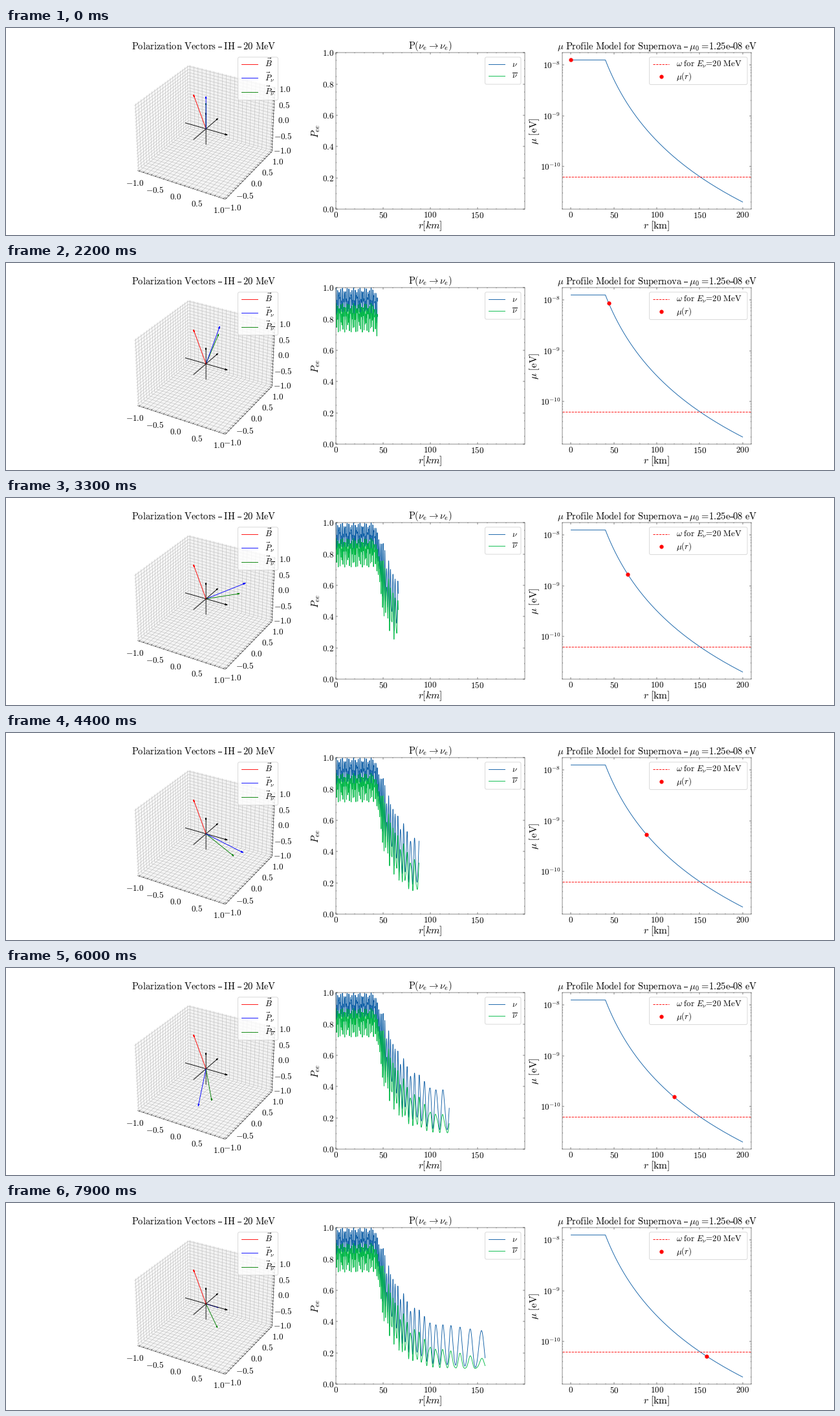
A matplotlib script for the animation above (8000 ms loop, 1280x320 px).

```python
import numpy as np
import matplotlib.pyplot as plt
from matplotlib.animation import FuncAnimation
from matplotlib.collections import LineCollection
from matplotlib.patches import FancyBboxPatch, Polygon
from matplotlib.ticker import (AutoMinorLocator, FuncFormatter, MultipleLocator,
                               NullFormatter)

W, H, DPI = 1280, 320, 80
PX = 72 / DPI                      # points per pixel
FRAMES, STEP_KM, SUB = 80, 2.0, 250
BLUE, GREEN = '#0C5DA5', '#00B945'
LINE, THIN = 0.89 * PX, 0.45 * PX
SMALL, LARGE = 13.1, 15.5          # text sizes in pixels

plt.rcParams.update({
    'mathtext.fontset': 'cm',
    'axes.linewidth': THIN,
    'lines.linewidth': LINE,
    'patch.linewidth': LINE,
    'axes.titlesize': 14.6 * PX,
    'axes.titlepad': 5.6 * PX,
    'xtick.top': True,
    'ytick.right': True,
})
for axis in ('xtick', 'ytick'):
    plt.rcParams.update({
        axis + '.direction': 'in',
        axis + '.labelsize': SMALL * PX,
        axis + '.major.size': 2.67 * PX,
        axis + '.minor.size': 1.33 * PX,
        axis + '.major.width': THIN,
        axis + '.minor.width': THIN,
        axis + '.major.pad': 3.1 * PX,
    })

# ---- physics: two coupled polarization vectors ----
ENERGY = 20e6                      # eV
OMEGA = 2.5e-3 / (2 * ENERGY)      # eV
MU0, R0 = 1.25e-8, 40.0            # eV, km
PER_KM = 5.068e9                   # eV to 1/km
THETA = np.arcsin(np.sqrt(2.18e-2))
B = (-float(np.sin(2 * THETA)), 0.0, float(np.cos(2 * THETA)))
RATIO = 0.8                        # antineutrino to neutrino flux


def mu(r):
    return MU0 * (R0 / np.maximum(r, R0)) ** 4


def slope(r, s):
    px, py, pz, qx, qy, qz = s
    m = MU0 * PER_KM * (R0 / max(r, R0)) ** 4
    w = OMEGA * PER_KM
    dx, dy, dz = m * (px - qx), m * (py - qy), m * (pz - qz)
    bx, by, bz = w * B[0], w * B[1], w * B[2]
    ax, ay, az = dx + bx, dy + by, dz + bz
    cx, cy, cz = dx - bx, dy - by, dz - bz
    return (ay * pz - az * py, az * px - ax * pz, ax * py - ay * px,
            cy * qz - cz * qy, cz * qx - cx * qz, cx * qy - cy * qx)


def advance(s, k, h):
    return [a + h * b for a, b in zip(s, k)]


def evolve():
    h = STEP_KM / SUB
    s = [0.0, 0.0, 1.0, 0.0, 0.0, RATIO]
    out = [s]
    for i in range((FRAMES - 1) * SUB):
        r = i * h
        k1 = slope(r, s)
        k2 = slope(r + h / 2, advance(s, k1, h / 2))
        k3 = slope(r + h / 2, advance(s, k2, h / 2))
        k4 = slope(r + h, advance(s, k3, h))
        s = [v + h / 6 * (a + 2 * b + 2 * c + d)
             for v, a, b, c, d in zip(s, k1, k2, k3, k4)]
        out.append(s)
    return np.array(out)


path = evolve()
radius = np.arange(len(path)) * STEP_KM / SUB
prob_nu = (1 + path[:, 2]) / 2
prob_anti = (1 + path[:, 5]) / 2

# ---- text and key helpers ----
HYPHEN = r'\frac{\;\,}{\;\,}\hspace{-0.09}'


def rm(s):
    """Upright text in math mode, with short hyphens."""
    words = (r'\text{%s}' % w.replace('-', '}' + HYPHEN + r'\text{')
             for w in s.split(' '))
    return r'\ '.join(words).replace(r'\text{}', '')


fig = plt.figure(figsize=(W / DPI, H / DPI), dpi=DPI, facecolor='white')
over = fig.add_axes([0, 0, 1, 1], zorder=5)
over.set_xlim(0, W)
over.set_ylim(H, 0)
over.axis('off')


def put(x, y, s, size=LARGE, rot=0):
    over.text(x, y, s, fontsize=size * PX, rotation=rot,
              ha='center', va='center')


def key(x, y, w, h, rows):
    """Framed key; each row is (height, label, line style)."""
    over.add_patch(FancyBboxPatch((x, y), w, h, facecolor='white',
                                  edgecolor='0.8', alpha=0.8,
                                  boxstyle='round,pad=0,rounding_size=2.5'))
    for cy, label, style in rows:
        xs = [x + 18] if 'marker' in style else [x + 5.5, x + 30.5]
        over.plot(xs, [cy] * len(xs), **style)
        over.text(x + 41.5, cy + 4.4, label, fontsize=12.9 * PX, va='baseline')


# ---- panel positions ----
BOTTOM, TOP = 0.125, 0.88
SIDE = (TOP - BOTTOM) * H
WIDE = 0.775 * W / 3.4
LEFT = [0.125 * W + i * 1.2 * WIDE for i in range(3)]


def panel(x, w):
    return fig.add_axes([x / W, BOTTOM, w / W, TOP - BOTTOM])


# ---- left: 3D view ----
x0, y0 = LEFT[0] + (WIDE - SIDE) / 2, (1 - TOP) * H
view = panel(x0, SIDE)
view.set_xlim(x0, x0 + SIDE)
view.set_ylim(y0 + SIDE, y0)
view.axis('off')
view.set_title('$' + rm('Polarization Vectors - IH - 20 MeV') + '$')

SCALE = SIDE / 0.185
CX = x0 + SIDE / 2 + 0.0025 * SCALE
CY = y0 + SIDE / 2 - 0.0025 * SCALE
BOX = 1.8294640721620434 * np.array([4, 4, 3]) / np.sqrt(41) / 2
el, az = np.radians(30), np.radians(-60)
RIGHT = np.array([-np.sin(az), np.cos(az), 0])
UP = np.array([-np.sin(el) * np.cos(az), -np.sin(el) * np.sin(az), np.cos(el)])
EYE = np.array([np.cos(el) * np.cos(az), np.cos(el) * np.sin(az), np.sin(el)])


def project(points):
    p = np.asarray(points, float) * BOX
    f = SCALE / (10 - p @ EYE)
    return np.column_stack([CX + f * (p @ RIGHT), CY - f * (p @ UP)])


M = 25 / 24
panes = [
    ([(-M, -M, -M), (-M, M, -M), (-M, M, M), (-M, -M, M)], 0.975),
    ([(-M, M, -M), (M, M, -M), (M, M, M), (-M, M, M)], 0.95),
    ([(-M, -M, -M), (M, -M, -M), (M, M, -M), (-M, M, -M)], 0.9625),
]
for corners, shade in panes:
    view.add_patch(Polygon(project(corners), facecolor=str(shade),
                           edgecolor='none', clip_on=False, zorder=1))

grid, ticks = [], []
IN, OUT = M - 0.033, M + 0.017
for t in np.linspace(-1, 1, 21):
    grid += [project([(t, -M, -M), (t, M, -M), (t, M, M)]),
             project([(M, t, -M), (-M, t, -M), (-M, t, M)]),
             project([(M, M, t), (-M, M, t), (-M, -M, t)])]
    ticks += [project([(t, -OUT, -M), (t, -IN, -M)]),
              project([(OUT, t, -M), (IN, t, -M)]),
              project([(OUT, M, t), (IN, M, t)])]
edges = [project(e) for e in ([(-M, -M, -M), (M, -M, -M)],
                              [(M, -M, -M), (M, M, -M)],
                              [(M, M, -M), (M, M, M)])]
for segs, color, z in ((grid, '#b0b0b0', 1.5), (ticks + edges, 'black', 2)):
    view.add_collection(LineCollection(segs, colors=color, zorder=z,
                                       linewidths=THIN, clip_on=False),
                        autolim=False)

for t in (-1, -0.5, 0, 0.5, 1):
    spots = project([(t, -M, -M), (M, t, -M), (M, M, t)])
    for (x, y), (dx, dy) in zip(spots, ((-7, 19), (10, 15.5), (15.5, 2))):
        put(x + dx, y + dy, f'${t:.1f}$', SMALL)


def arrow_path(base, tip, ratio=0.05):
    a, b = project([base, tip])
    d = (a - b) * ratio
    c, s = np.cos(np.radians(15)), np.sin(np.radians(15))
    barbs = [b + (c * d[0] - k * d[1], k * d[0] + c * d[1]) for k in (s, -s)]
    return np.array([a, b, barbs[0], b, barbs[1]]).T


def arrow(base, tip, color, z=3.0):
    return view.plot(*arrow_path(base, tip), color=color, zorder=z,
                     clip_on=False)[0]


for unit in np.eye(3):
    arrow(-unit / 2, unit / 2, 'black')
ORIGIN = (0, 0, 0)
arrow(ORIGIN, B, 'red', 3.1)
arrow_nu = arrow(ORIGIN, (0, 0, 1), 'blue')
arrow_anti = arrow(ORIGIN, (0, 0, RATIO), 'green')
key(358.5, 45, 62, 66.5, [
    (56, r'$\vec{B}$', {'color': 'red'}),
    (77.3, r'$\vec{P}_\nu$', {'color': 'blue'}),
    (99, r'$\vec{P}_{\overline{\nu}}$', {'color': 'green'})])

# ---- middle: survival probability ----
prob = panel(LEFT[1], WIDE)
line_nu, = prob.plot([], [], color=BLUE)
line_anti, = prob.plot([], [], color=GREEN)
prob.set_xlim(0, 199.99)
prob.set_ylim(0, 1)
prob.yaxis.set_major_locator(MultipleLocator(0.2))
prob.yaxis.set_minor_locator(AutoMinorLocator(4))
prob.yaxis.set_major_formatter(FuncFormatter(lambda v, _: f'${v:.1f}$'))
prob.set_title(r'$\text{P}(\nu_e\rightarrow\nu_e)$')
key(740.5, 45, 55.5, 42, [
    (56, r'$\nu$', {'color': BLUE}),
    (74, r'$\overline{\nu}$', {'color': GREEN})])
put(655.5, 306, '$r[km]$')
put(479.5, 159, '$P_{ee}$', rot=90)

# ---- right: potential profile ----
prof = panel(LEFT[2], WIDE)
r_all = np.linspace(0, 200, 1001)
prof.plot(r_all, mu(r_all), color=BLUE)
prof.set_yscale('log')
prof.set_xlim(-10, 210)
span = (mu(0) / mu(200)) ** 0.05
prof.set_ylim(mu(200) / span, mu(0) * span)
DASH = {'color': 'red', 'ls': '--'}
SPOT = {'color': 'red', 'marker': 'o', 'ms': 5.33 * PX, 'mew': LINE, 'ls': ''}
prof.axhline(OMEGA, **DASH)
dot, = prof.plot([0], [MU0], **SPOT)
prof.yaxis.set_major_formatter(
    FuncFormatter(lambda v, _: '$10^{%d}$' % round(np.log10(v))))
prof.yaxis.set_minor_formatter(NullFormatter())
prof.set_title(r'$\mu\ ' + rm('Profile Model for Supernova -') + r'\ \mu_0\;'
               + rm(f'={MU0:.2e} eV') + '$')
key(994.5, 45, 151.5, 42.5, [
    (55.5, r'$\omega\ ' + rm('for') + r'\ E_\nu' + rm('=20 MeV') + '$', DASH),
    (74.7, r'$\mu(r)$', SPOT)])
put(1006, 306, r'$r\ \text{[km]}$')
put(817, 159, r'$\mu\ \text{[eV]}$', rot=90)

for ax in (prob, prof):
    ax.xaxis.set_major_locator(MultipleLocator(50))
    ax.xaxis.set_minor_locator(AutoMinorLocator(5))
    ax.xaxis.set_major_formatter(FuncFormatter(lambda v, _: f'${v:.0f}$'))


def draw(i):
    n = i * SUB
    end = n + 1 if i else 0
    line_nu.set_data(radius[:end], prob_nu[:end])
    line_anti.set_data(radius[:end], prob_anti[:end])
    for item, tip in ((arrow_nu, path[n, :3]), (arrow_anti, path[n, 3:])):
        item.set_data(*arrow_path(ORIGIN, tip))
        item.set_zorder(3 + (tip * BOX) @ EYE)
    r = i * STEP_KM
    dot.set_data([r], [mu(r)])
    return line_nu, line_anti, arrow_nu, arrow_anti, dot


anim = FuncAnimation(fig, draw, frames=FRAMES, interval=100, repeat=True,
                     repeat_delay=0, blit=False)
plt.show()
```
